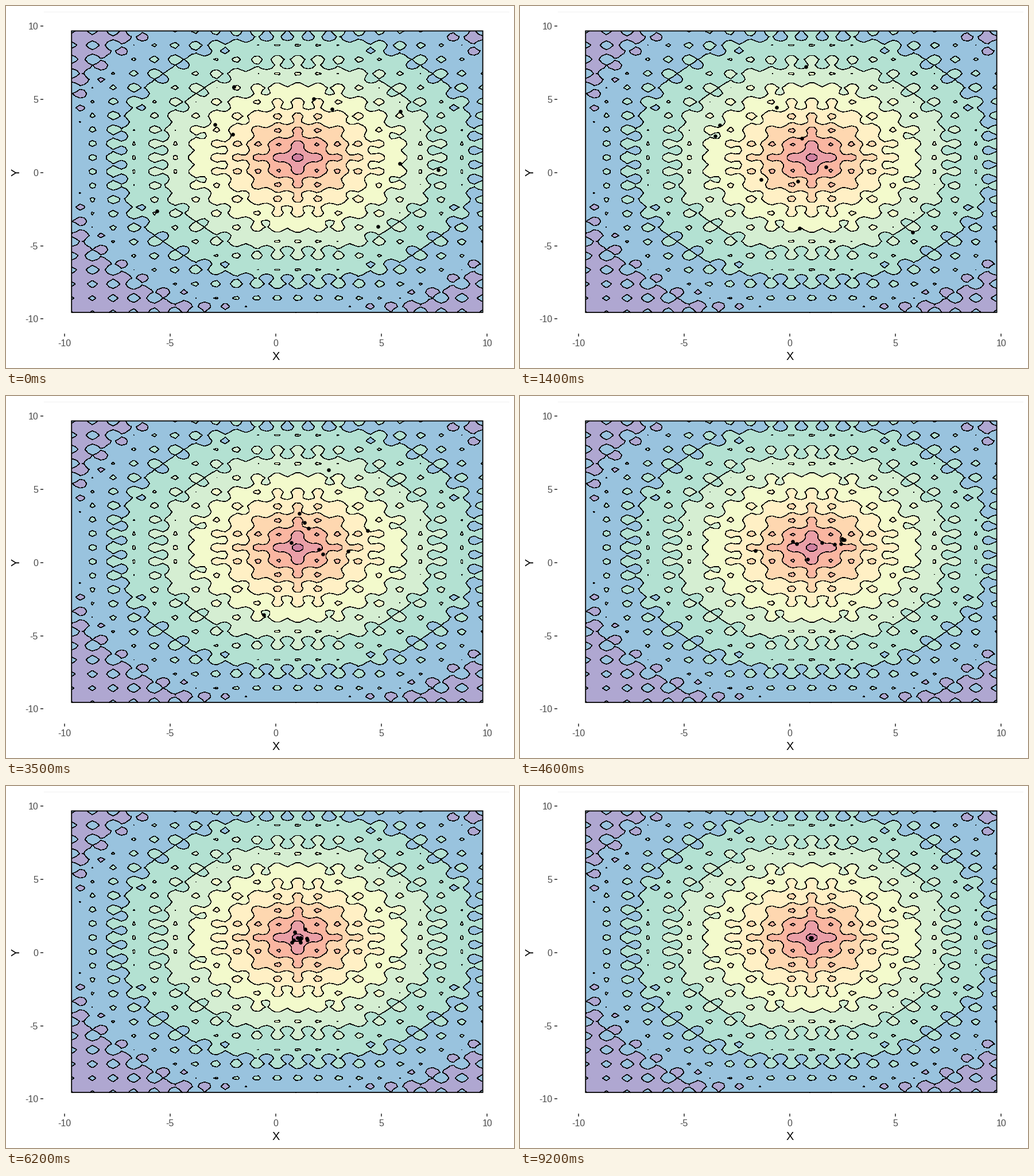
A matplotlib script that plays this animation: 885x632 px, repeating every 10000 ms.

```python
import numpy as np
import matplotlib.pyplot as plt
from matplotlib.animation import FuncAnimation
from matplotlib.colors import to_rgb
from matplotlib.patches import Rectangle

W, H, DPI = 885, 632, 100
FRAMES, STEP = 100, 100
HOP = 5  # frames per swarm iteration
PX = 72 / DPI  # points per pixel

# Heat map rectangle and axis scale, in pixels
LEFT, RIGHT, TOP, BOTTOM = 114.2, 830.6, 43.5, 534.9
X0, Y0, XU, YU = 470, 290.7, 36.83, 25.57

SPECTRAL = ["#9E0142", "#D53E4F", "#F46D43", "#FDAE61", "#FEE08B",
            "#E6F598", "#ABDDA4", "#66C2A5", "#3288BD", "#5E4FA2"]

# Starting swarm in axis units
START = np.array([(-1.98, 5.85), (1.79, 5.03), (2.66, 4.32), (5.89, 4.17),
                  (-2.88, 3.27), (-2.04, 2.61), (5.86, 0.61), (7.68, 0.17),
                  (-5.62, -2.63), (4.83, -3.69)])


def ackley(x, y):
    u, v = x - 1, y - 1
    bowl = -20 * np.exp(-0.2 * np.sqrt((u**2 + v**2) / 2))
    waves = np.exp((np.cos(2 * np.pi * u) + np.cos(2 * np.pi * v)) / 2)
    return bowl - waves + 20 + np.e


def pale(color):
    """Half-transparent colour flattened on white."""
    return tuple((np.array(to_rgb(color)) + 1) / 2)


def draw_surface(ax):
    g = np.linspace(-10, 10, 100)
    z = ackley(*np.meshgrid(g, g))
    px = np.interp(g, [-10, 10], [LEFT, RIGHT])
    py = np.interp(g, [-10, 10], [BOTTOM, TOP])
    levels = np.arange(0, 21, 2)
    ax.contourf(px, py, z, levels, colors=[pale(c) for c in SPECTRAL])
    # Aliased strokes grow by about a pixel, so a hairline is enough
    ax.contour(px, py, z, levels[1:-1], colors="black",
               linewidths=0.4 * PX, antialiased=False)
    ax.add_patch(Rectangle((LEFT, TOP), RIGHT - LEFT, BOTTOM - TOP, fill=False,
                           ec="black", lw=1.8 * PX, snap=False))


def draw_axes(ax):
    tick = dict(color="#333333", lw=1.6 * PX, solid_capstyle="butt")
    label = dict(color="#4D4D4D", fontsize=16 * PX, va="baseline")
    for n in range(-10, 11, 5):
        x, y = X0 + n * XU, Y0 - n * YU
        ax.plot([x, x], [571.5, 576.5], **tick)
        ax.plot([60, 65], [y, y], **tick)
        ax.text(x, 593.5, f"{n}", ha="center", **label)
        ax.text(56, y + 6, f"{n}", ha="right", **label)
    title = dict(color="black", fontsize=20 * PX, ha="center")
    ax.text(X0, 618.5, "X", va="baseline", **title)
    ax.text(18, Y0, "Y", rotation=90, va="center_baseline", **title)
    ax.plot([66, 876], [10, 10], color="#F0F0F0", lw=PX)


def spread(frame):
    """Typical distance of the swarm from the optimum at (1, 1)."""
    return 4.5 * np.exp(-(frame / 38) ** 2)


def swarm_stops():
    """Swarm position at each iteration: momentum, chance and a shrinking reach."""
    rng = np.random.default_rng(4)
    stops = [START]
    swing = (START - 1) / spread(0)
    for frame in range(HOP, FRAMES + 1, HOP):
        swing = 0.5 * swing + 0.85 * rng.normal(size=START.shape)
        stops.append(np.clip(1 + spread(frame) * swing, -9.5, 9.5))
    return stops


plt.rcParams["font.family"] = "Liberation Sans"
fig = plt.figure(figsize=(W / DPI, H / DPI), dpi=DPI, facecolor="white")
ax = fig.add_axes([0, 0, 1, 1])
ax.axis("off")
draw_surface(ax)
draw_axes(ax)
ax.set(xlim=(0, W), ylim=(H, 0))

dots, = ax.plot([], [], "o", color="black", ms=6.6 * PX, mew=0, zorder=5)
stops = swarm_stops()


def update(i):
    k, part = divmod(i, HOP)
    x, y = (stops[k] + (stops[k + 1] - stops[k]) * part / HOP).T
    dots.set_data(X0 + x * XU, Y0 - y * YU)
    return dots,


anim = FuncAnimation(fig, update, frames=FRAMES, interval=STEP,
                     repeat=True, repeat_delay=0, blit=False)
plt.show()
```
